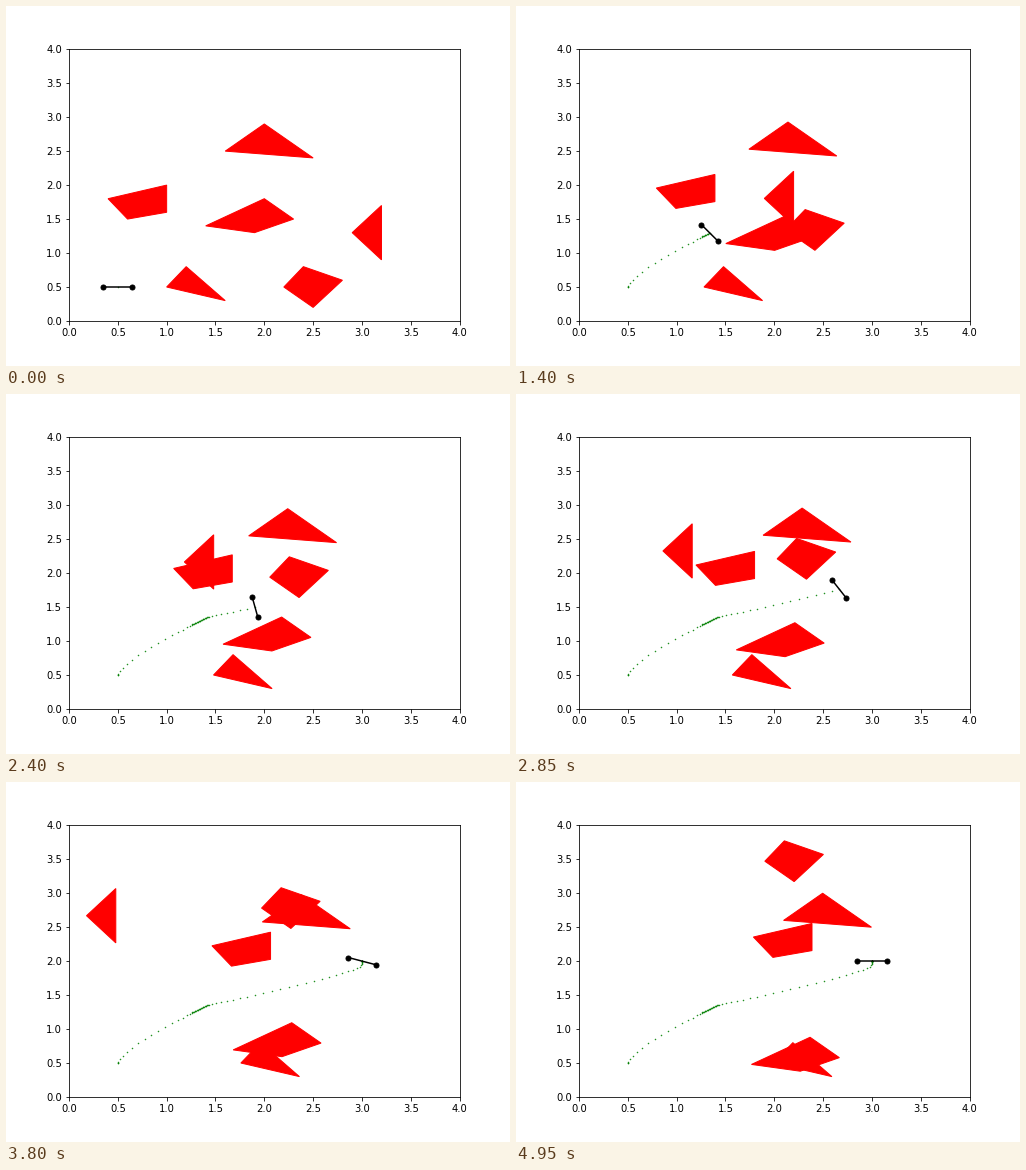
Write a matplotlib script that moves like this. It is 504 px wide and 360 px high and loops after 5000 ms.

```python
import numpy as np
import matplotlib.pyplot as plt
from matplotlib.animation import FuncAnimation
from matplotlib.patches import Polygon

FRAMES = 100
HALF_ROD = 0.15

# Obstacles: corners and displacement per frame
OBSTACLES = [
    ([(1.6, 2.5), (2.0, 2.9), (2.5, 2.4)], (0.005, 0.001)),
    ([(0.4, 1.8), (1.0, 2.0), (1.0, 1.6), (0.6, 1.5)], (0.014, 0.0056)),
    ([(1.4, 1.4), (2.0, 1.8), (2.3, 1.5), (1.9, 1.3)], (0.0037, -0.0093)),
    ([(1.0, 0.5), (1.2, 0.8), (1.6, 0.3)], (0.01, 0.0)),
    ([(2.2, 0.5), (2.4, 0.8), (2.8, 0.6), (2.5, 0.2)], (-0.003, 0.03)),
    ([(2.9, 1.3), (3.2, 1.7), (3.2, 0.9)], (-0.0358, 0.018)),
]


def ramp(t, start, end):
    return np.clip((t - start) / (end - start), 0, 1)


def ease(t, start, end, power=1):
    """Smoothstep from 0 to 1; a power below 1 puts more motion early."""
    s = ramp(t, start, end) ** power
    return s * s * (3 - 2 * s)


def rod_pose(t):
    """Centre and angle: a first dash, a slow drift, then a dash to the goal."""
    drift = ramp(t, 17.5, 38)
    x = 0.5 + 0.76 * ease(t, 1.5, 17.5) + 0.153 * drift + 1.587 * ease(t, 38, 65)
    y = (0.5 + 0.743 * ease(t, 1.2, 18, 0.8) + 0.105 * drift
         + 0.652 * ease(t, 38, 70))
    angle = (-55 * ease(t, 2, 14) - 24 * ease(t, 28, 48)
             + 79 * ease(t, 48, 99, 0.68))
    return x, y, np.radians(angle)


xs, ys, angles = rod_pose(np.arange(FRAMES))

plt.rcParams.update({"font.family": "DejaVu Sans", "font.size": 10})
fig = plt.figure(figsize=(7, 5), dpi=72, facecolor="white")
fig.subplots_adjust(left=0.125, right=0.9, bottom=0.125, top=0.88)
ax = fig.add_subplot(xlim=(0, 4), ylim=(0, 4))
ticks = np.arange(0, 4.1, 0.5)
ax.set_xticks(ticks)
ax.set_yticks(ticks)

corners = [np.array(points) for points, _ in OBSTACLES]
velocities = [np.array(v) for _, v in OBSTACLES]
shapes = [ax.add_patch(Polygon(c, closed=True, color="red", linewidth=1))
          for c in corners]
trail, = ax.plot([], [], ".", color="green", markersize=1)
rod, = ax.plot([], [], "o-", color="black", linewidth=1.5, markersize=5)


def update(n):
    for shape, points, v in zip(shapes, corners, velocities):
        shape.set_xy(points + n * v)
    trail.set_data(xs[:n + 1], ys[:n + 1])
    dx = HALF_ROD * np.cos(angles[n])
    dy = HALF_ROD * np.sin(angles[n])
    rod.set_data([xs[n] - dx, xs[n] + dx], [ys[n] - dy, ys[n] + dy])
    return [*shapes, trail, rod]


anim = FuncAnimation(fig, update, frames=FRAMES, interval=50,
                     repeat=True, repeat_delay=0)
plt.show()
```
